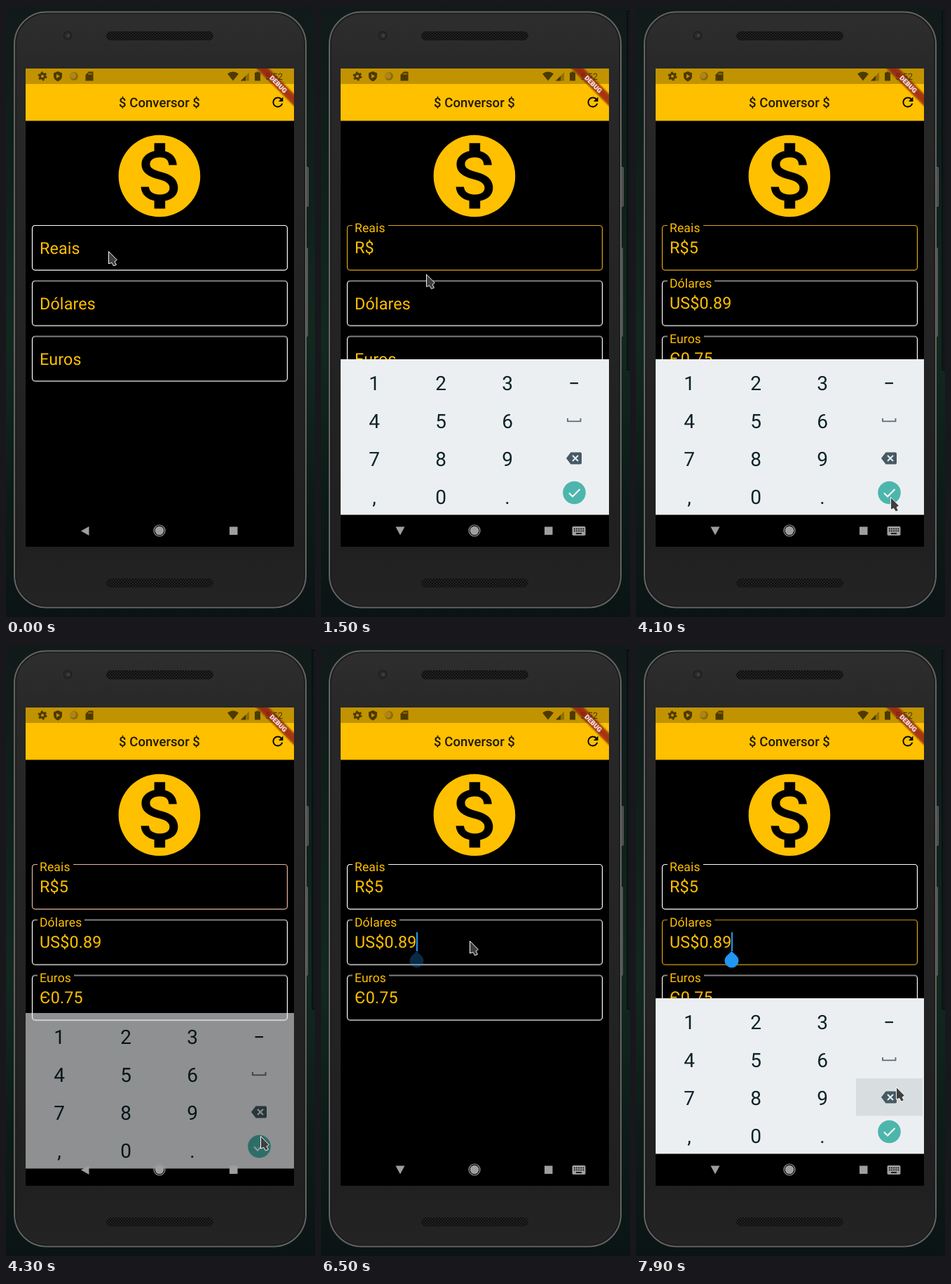
These frames come from a looping animation (441x870 px, 8000 ms). An HTML page:

```html
<!DOCTYPE html>
<html lang="pt">
<head>
<meta charset="utf-8">
<title>Conversor</title>
<style>
html, body { margin: 0; width: 100%; height: 100%; overflow: hidden; background: #0d1715; }
svg { display: block; width: 441px; height: 870px; font-family: Roboto, "Noto Sans", sans-serif; text-rendering: geometricPrecision; }

/* Every part shares one 8 s clock; 1.25% = 100 ms. */
.a { animation: 8s step-end infinite; }
.edge { animation-name: edge; }
.cover { animation-name: cover; }
.keys { animation-name: keys; }
.open { animation-name: open; }
.closed { animation-name: closed; }
.mouse { animation-name: mouse; }
.caret { animation-name: caret; }
.handle { animation-name: handle; }
.press { animation-name: press; }
.typed { animation-name: typed; }
.prefix { animation-name: prefix; }
.line1 { animation-name: line1; }
.line2 { animation-name: line2; }
.gap1 { animation-name: gap1; }
.gap2 { animation-name: gap2; --w: 67px; }
.gap3 { animation-name: gap2; --w: 52px; }
.label1 { animation-name: label1; }
.label2 { animation-name: label2; }

.line { fill: none; stroke: #fff; stroke-width: 1.2; }
.amber { fill: #ffc000; }
.label, .value { fill: #ffc000; font-size: 23.3px; letter-spacing: .14px; }
.dark { fill: #4d3a00; }
.nav { fill: #9e9e9e; }

@keyframes edge { 0% { opacity: 0 } 6.25%, 100% { opacity: 1 } }
@keyframes cover { 0% { opacity: 0 } 10% { opacity: 1 } 52.5% { opacity: 0 } 82.5%, 100% { opacity: 1 } }
@keyframes open { 0% { opacity: 0 } 8.75% { opacity: 1 } 52.5% { opacity: 0 } 81.25%, 100% { opacity: 1 } }
@keyframes closed { 0% { opacity: 1 } 8.75% { opacity: 0 } 52.5% { opacity: 1 } 81.25%, 100% { opacity: 0 } }
@keyframes keys {
  0% { opacity: 0; transform: translateY(16px) }
  10% { opacity: .785; transform: translateY(16px) }
  11.25% { opacity: 1; transform: none }
  52.5% { opacity: .9; transform: translateY(5px) }
  53.75% { opacity: .606; transform: translateY(21px) }
  55% { opacity: 0; transform: translateY(16px) }
  82.5% { opacity: .785; transform: translateY(16px) }
  83.75%, 100% { opacity: 1; transform: none }
}
@keyframes mouse {
  0% { transform: translate(146px, 349px) }
  16.25% { transform: translate(146px, 349px); animation-timing-function: steps(3) }
  20% { transform: translate(152px, 398px); animation-timing-function: steps(3) }
  23.75% { transform: translate(168px, 543px); animation-timing-function: steps(3) }
  27.5% { transform: translate(174px, 592px) }
  40% { transform: translate(174px, 592px); animation-timing-function: steps(3) }
  43.75% { transform: translate(272px, 650px); animation-timing-function: steps(3) }
  47.5% { transform: translate(363px, 699px) }
  65% { transform: translate(363px, 699px); animation-timing-function: steps(2) }
  67.5% { transform: translate(340px, 655px); animation-timing-function: steps(3) }
  71.25% { transform: translate(232px, 458px); animation-timing-function: steps(2) }
  73.75% { transform: translate(212px, 421px) }
  87.5% { transform: translate(212px, 421px); animation-timing-function: steps(4) }
  92.5% { transform: translate(366px, 654px) }
  93.75%, 100% { transform: translate(371px, 629px) }
}
@keyframes caret {
  0% { opacity: 0; height: 24px; transform: translate(76px, 331px) }
  8.75% { opacity: 1 }
  15% { opacity: 0 }
  21.25% { opacity: 1 }
  27.5% { opacity: 0 }
  36.25% { opacity: 1; height: 27px; transform: translate(89px, 329.5px) }
  41.25% { opacity: 0 }
  47.5% { opacity: 1 }
  51.25% { opacity: 0 }
  81.25% { opacity: 1; transform: translate(136px, 408.5px) }
  88.75% { opacity: 0 }
  93.75%, 100% { opacity: 1; height: 27px; transform: translate(136px, 408.5px) }
}
@keyframes handle { 0% { opacity: 0 } 81.25% { opacity: .28 } 82.5%, 100% { opacity: 1 } }
@keyframes press { 0% { opacity: 0 } 98.75%, 100% { opacity: 1 } }
@keyframes typed { 0% { opacity: 0 } 36.25%, 100% { opacity: 1 } }
@keyframes prefix { 0% { opacity: 0 } 8.75% { opacity: .2 } 10%, 100% { opacity: 1 } }
@keyframes line1 {
  0% { stroke: #fff } 8.75% { stroke: #f3d590 } 10% { stroke: #e0a414 }
  53.75% { stroke: #e8b59a } 55%, 100% { stroke: #fff }
}
@keyframes line2 { 0% { stroke: #fff } 82.5% { stroke: #f0cf80 } 83.75%, 100% { stroke: #e0a414 } }
@keyframes gap1 { 0% { width: 0 } 8.75% { width: 8px } 10% { width: 34px } 11.25% { width: 49px } 12.5%, 100% { width: 51px } }
@keyframes gap2 { 0% { width: 0 } 36.25%, 100% { width: var(--w) } }
@keyframes label1 {
  0% { font-size: 23.3px; transform: translateY(40px) }
  8.75% { font-size: 22.7px; transform: translateY(36px) }
  10% { font-size: 19.7px; transform: translateY(19.5px) }
  11.25% { font-size: 17.8px; transform: translateY(10px) }
  12.5%, 100% { font-size: 17.5px; transform: translateY(9px) }
}
@keyframes label2 {
  0% { font-size: 23.3px; transform: translateY(40px) }
  36.25%, 100% { font-size: 17.5px; transform: translateY(9px) }
}
</style>
</head>
<body>
<svg viewBox="0 0 441 870">
  <defs>
    <linearGradient id="desk" x2="0" y2="1">
      <stop offset="0" stop-color="#111a19"/><stop offset=".3" stop-color="#10201b"/>
      <stop offset=".55" stop-color="#12281f"/><stop offset=".8" stop-color="#0d1b18"/>
      <stop offset="1" stop-color="#0b1414"/>
    </linearGradient>
    <linearGradient id="shell" x2="0" y2="1">
      <stop offset="0" stop-color="#2e2e2e"/><stop offset=".1" stop-color="#282828"/>
      <stop offset=".9" stop-color="#202020"/><stop offset="1" stop-color="#242424"/>
    </linearGradient>
    <pattern id="mesh" width="4" height="4" patternUnits="userSpaceOnUse">
      <path d="M0 0h2v2H0zM2 2h2v2H2z" fill="#0e0e0e"/>
    </pattern>
    <clipPath id="screen"><path d="M28 89h383v681H28z"/></clipPath>
    <filter id="soft"><feGaussianBlur stdDeviation="2.5"/></filter>
    <g id="speaker">
      <rect x="143" width="153" height="13" rx="6.5" fill="#222"/>
      <rect x="143" width="153" height="13" rx="6.5" fill="url(#mesh)"/>
    </g>
    <rect id="box" x="37.5" width="364" height="63.6" rx="4"/>
  </defs>

  <path d="M0 0h441v870H0z" fill="url(#desk)"/>
  <path class="a edge" d="M442 7.5h-5v511h5" fill="#0f191c" stroke="#04080a"/>

  <!-- phone -->
  <g fill="#4a4a4a" stroke="#5c5c5c">
    <rect x="426" y="229.5" width="5.5" height="56" rx="1"/>
    <rect x="426" y="344.5" width="4.5" height="126" rx="1"/>
  </g>
  <rect x="12" y="8.5" width="416" height="848" rx="46" fill="url(#shell)" stroke="#646464" stroke-width="2"/>
  <rect x="14" y="10.5" width="412" height="844" rx="44" fill="none" stroke="#1d1d1d" stroke-width="1.5"/>
  <circle cx="88" cy="42" r="6.5" fill="#202020"/>
  <circle cx="88" cy="42" r="4.5" fill="#2a2c30"/>
  <circle cx="89" cy="42" r="2" fill="#3e4248"/>
  <use href="#speaker" y="36"/>
  <use href="#speaker" y="815"/>

  <g clip-path="url(#screen)">
    <path d="M28 89h383v681H28z"/>
    <path d="M28 89h383v22H28z" fill="#c29300"/>
    <path class="amber" d="M28 111h383v52.5H28z"/>

    <!-- status bar -->
    <g class="dark">
      <circle cx="52" cy="100" r="3.5" fill="none" stroke="#4d3a00" stroke-width="2.8"/>
      <circle cx="52" cy="100" r="5.5" fill="none" stroke="#4d3a00" stroke-width="2" stroke-dasharray="2.88"/>
      <path d="M74 93l6 2.500v4.500q0 5-6 7.500q-6-2.500-6-7.500v-4.500z"/>
      <path d="M72 97l5 3-5 3z" fill="#c29300"/>
      <circle cx="97" cy="100" r="6" fill="#8f6c06"/>
      <circle cx="95.5" cy="99" r="4.5" fill="#ae841a"/>
      <path d="M118 93.500h6.500v13h-11V98z"/>
      <path d="M118 95.500v2.500m2-2.500v2.500m2-2.500v2.500" stroke="#c29300"/>
      <path d="M316 96.500q8-6 16 0L324 106.500z"/>
      <path d="M335 106.500l12-12v12z" opacity=".4"/>
      <path d="M335 106.500l7-7v7z"/>
      <path d="M357.500 93.500h3v1.300h2.500v11.700h-8V94.800h2.500z"/>
      <text x="370" y="105" font-size="13">5:52</text>
    </g>

    <!-- app bar -->
    <text x="219" y="144" font-size="18.6" font-weight="500" text-anchor="middle" fill="#211900">$ Conversor $</text>
    <path transform="translate(376.8 125.8) scale(.932)" d="M17.650 6.350C16.200 4.900 14.210 4 12 4c-4.420 0-7.990 3.580-7.990 8s3.570 8 7.990 8c3.730 0 6.840-2.550 7.730-6h-2.080c-.82 2.330-3.040 4-5.650 4-3.310 0-6-2.690-6-6s2.690-6 6-6c1.660 0 3.140.69 4.220 1.780L13 11h7V4z"/>

    <!-- coin -->
    <path class="amber" transform="translate(149 172) scale(5.83)" d="M12 2C6.480 2 2 6.480 2 12s4.480 10 10 10 10-4.480 10-10S17.520 2 12 2zm1.410 16.090V20h-2.670v-1.930c-1.710-.36-3.160-1.460-3.270-3.400h1.960c.1 1.050.82 1.870 2.650 1.870 1.960 0 2.400-.98 2.400-1.590 0-.83-.44-1.610-2.670-2.140-2.480-.6-4.180-1.620-4.180-3.670 0-1.720 1.390-2.840 3.110-3.210V4h2.670v1.950c1.860.45 2.790 1.860 2.850 3.390H14.300c-.05-1.110-.64-1.870-2.220-1.870-1.500 0-2.400.68-2.400 1.640 0 .84.65 1.390 2.670 1.910s4.180 1.390 4.180 3.910c-.01 1.830-1.380 2.830-3.120 3.160z"/>

    <!-- fields -->
    <g transform="translate(0 312.5)">
      <use href="#box" class="a line line1"/>
      <rect class="a gap1" x="45" y="-2" height="4"/>
      <text class="a label label1" x="48">Reais</text>
      <text class="a value prefix" x="48" y="39">R$</text>
      <text class="a value typed" x="75.8" y="39">5</text>
    </g>
    <g transform="translate(0 391.5)">
      <use href="#box" class="a line line2"/>
      <rect class="a gap2" x="45" y="-2" height="4"/>
      <text class="a label label2" x="48">Dólares</text>
      <text class="a value typed" x="48" y="39">US$0.89</text>
    </g>
    <g transform="translate(0 470.5)">
      <use href="#box" class="line"/>
      <rect class="a gap3" x="45" y="-2" height="4"/>
      <text class="a label label2" x="48">Euros</text>
      <text class="a value typed" x="48" y="39">Є0.75</text>
    </g>
    <rect class="a caret" width="2" height="24" fill="#2196f3"/>
    <path class="a handle" d="M136.500 436l7 6.400a10 10 0 1 1-14 0z" fill="#2196f3"/>
    <path class="a cover" d="M28 503h383v267H28z"/>

    <!-- keyboard -->
    <g class="a keys">
      <path d="M28 503h383v221.500H28z" fill="#eceff1"/>
      <path class="a press" d="M314 617h95v53.500h-95z" fill="#d8dedf"/>
      <g font-size="28" text-anchor="middle" fill="#0c2329">
        <text x="76 171 266" y="547">123</text>
        <text x="76 171 266" y="601">456</text>
        <text x="76 171 266" y="655">789</text>
        <text x="76 171 266" y="709">,0.</text>
      </g>
      <path d="M355.500 536h11.500v2.200h-11.500z" fill="#0c2329"/>
      <path d="M352 587v4.300h18.500V587" fill="none" stroke="#5c6c74" stroke-width="1.8"/>
      <path d="M356.500 635.500H370q2 0 2 2v13q0 2-2 2h-13.500L350 644z" fill="#455a64"/>
      <path d="M359 640l8 8m0-8l-8 8" stroke="#eceff1" stroke-width="2"/>
      <circle cx="361.5" cy="693" r="16.3" fill="#4db6ac"/>
      <path d="M354 693.500l5 5 10.500-10.500" fill="none" stroke="#fff" stroke-width="2"/>
    </g>

    <!-- navigation bar -->
    <g class="nav">
      <path class="a closed" d="M107 747.500l11.500-6.500v13z"/>
      <path class="a open" d="M106.500 741.500h13l-6.500 12z"/>
      <circle cx="219" cy="747" r="6.3"/>
      <circle cx="219" cy="747" r="8" fill="none" stroke="#9e9e9e" stroke-width="1.2"/>
      <path d="M319 741.500h11.500V753H319z"/>
      <g class="a open">
        <rect x="358.5" y="741" width="19" height="13" rx="1.8"/>
        <path d="M361 744.500h14.500M361 747.500h14.500" stroke="#000" stroke-width="1.7" stroke-dasharray="1.8 1.3"/>
        <path d="M364 751.200h8" stroke="#000" stroke-width="1.6"/>
      </g>
    </g>

    <!-- corner ribbon -->
    <g transform="translate(411 89) rotate(45)">
      <path d="M-60 26h120v11.300H-60z" opacity=".5" filter="url(#soft)"/>
      <path d="M-60 26h120v11.300H-60z" fill="#b71c1c" fill-opacity=".63"/>
      <text y="35" font-size="9.5" font-weight="900" text-anchor="middle" fill="#fff">DEBUG</text>
    </g>
  </g>

  <path class="a mouse" d="M.5.5v17.500l4.500-1.500 2.500 4.500 4-1.500-2.500-4.500 3.300-2.500z" fill="#3f3f3f" stroke="#f4f4f4" stroke-linejoin="round"/>
</svg>
</body>
</html>
```
